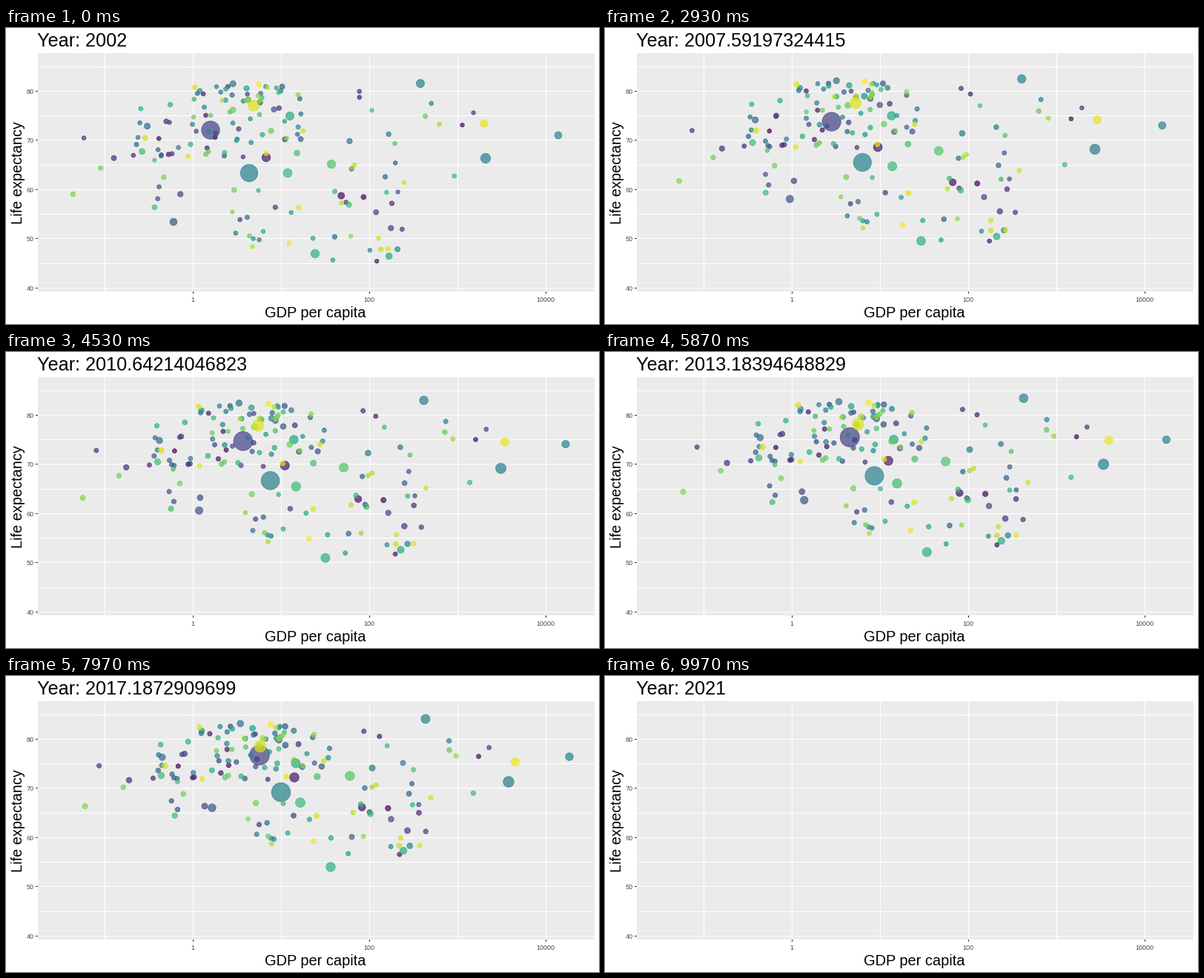
A matplotlib script that plays this animation: 800 px wide and 400 px high, repeating every 10 s.

```python
import numpy as np
import matplotlib
import matplotlib.pyplot as plt
from matplotlib.animation import FuncAnimation
from matplotlib.patches import Rectangle

W, H, DPI = 800, 400, 100
TICKS, LOOP, STEPS = 400, 10000, 300   # the picture steps 3 times in 4 ticks
START, SPAN, KNOWN_YEARS = 2002, 19, 18
TREND_YEARS = 15.2                     # time the key points below are apart
PX = 72 / DPI                          # points per pixel
LEFT, RIGHT, TOP, BOTTOM = 43, 794, 34, 356

plt.rcParams["font.family"] = "Liberation Sans"

# Main bubbles: start x, y, end x, y, radius, hue
BUBBLES = np.array([
    (276, 138, 342, 107, 12, .19),
    (328, 196, 371, 157, 11.5, .43),
    (334, 105, 343, 95, 7, .95),
    (417, 305, 438, 258, 5.5, .64),
    (647, 176, 678, 143, 6.4, .42),
    (645, 129, 687, 116, 5, .97),
    (559, 75, 566, 58, 5.3, .45),
    (383, 119, 391, 118, 5.3, .6),
    (439, 184, 464, 135, 5.5, .73),
    (380, 196, 397, 171, 5.7, .68),
    (351, 175, 389, 137, 5.5, .06),
    (226, 262, 278, 178, 4.6, .25),
    (745, 145, 760, 109, 4.6, .45),
])

# Groups of small dots: count, centre x, y, spread x, y
GROUPS = [
    (32, 325, 88, 45, 8),
    (54, 290, 138, 72, 24),
    (38, 425, 268, 78, 32),
    (18, 550, 150, 62, 48),
    (14, 165, 185, 50, 36),
]

rng = np.random.default_rng(7)


def scatter_group(count, cx, cy, sx, sy):
    # Even spread over 1.6 deviations keeps stray dots away
    offset = rng.uniform(-1.6, 1.6, (count, 2))
    return np.array([cx, cy]) + offset * [sx, sy]


def build_crowd():
    """Start and travel of the small dots; low ones climb the most."""
    begin = np.vstack([scatter_group(*g) for g in GROUPS])
    depth = np.clip(begin[:, 1] - 90, 0, None)
    drift = rng.normal(10, 6, len(begin)) + 17 * (depth > 0)
    return begin, np.column_stack([drift, -(11 + .28 * depth)])


CROWD, CROWD_TRAVEL = build_crowd()
N = len(CROWD)
HUE = np.concatenate([BUBBLES[:, 5], rng.random(N)])
RADIUS = np.concatenate([BUBBLES[:, 4],
                         np.clip(2.5 + rng.exponential(.4, N), 0, 4.2)]) + .2
ORDER = np.argsort(HUE)


def share(t, power):
    """Travelled part in x (easing out) and in y (steady)."""
    return np.array([1 - (1 - min(t, 1)) ** power, min(t, 1.1)])


def places(elapsed):
    t = elapsed / TREND_YEARS
    begin, end = BUBBLES[:, :2], BUBBLES[:, 2:4]
    main = begin + (end - begin) * share(t, 1.3)
    crowd = CROWD + CROWD_TRAVEL * share(t, 2)
    return np.vstack([main, crowd])[ORDER]


def areas(elapsed):
    r = RADIUS * (1 + .006 * elapsed)
    return ((2 * r * PX) ** 2)[ORDER]


fig = plt.figure(figsize=(W / DPI, H / DPI), dpi=DPI, facecolor="white")
ax = fig.add_axes([0, 0, 1, 1])
ax.set_xlim(0, W)
ax.set_ylim(H, 0)
ax.axis("off")


def box(x, y, w, h, color):
    ax.add_patch(Rectangle((x, y), w, h, fc=color, lw=0, antialiased=False))


def label(x, y, s, px, color="black", **kw):
    return ax.text(x, y, s, fontsize=px * PX, color=color, **kw)


def grid_x(k):
    return round(133 + 119.05 * k)


def grid_y(k):
    return round(51.6 + 33.27 * k)


box(LEFT, TOP, RIGHT - LEFT, BOTTOM - TOP, "#EBEBEB")
for k in range(10):
    box(LEFT, grid_y(k), RIGHT - LEFT, 1, "white")
for k in range(6):
    box(grid_x(k), TOP, 1, BOTTOM - TOP, "white")

# Every second grid line carries a tick and a label
for k in range(1, 10, 2):
    y = grid_y(k)
    box(LEFT - 3, y, 3, 1, "#333333")
    label(38, y + 4, str(85 - 5 * k), 9, "#4D4D4D", ha="right")
for k in range(1, 6, 2):
    x = grid_x(k)
    box(x, BOTTOM, 1, 3, "#333333")
    label(x, 370, str(10 ** (k - 1)), 9, "#4D4D4D", ha="center")

label(417.5, 391, "GDP per capita", 20, ha="center")
label(22, 195.5, "Life expectancy", 20, ha="center", va="baseline",
      rotation=90, rotation_mode="anchor")
title = label(42.5, 25, "", 25.3)

colors = matplotlib.colormaps["viridis"](HUE[ORDER])
colors[:, 3] = .7
dots = ax.scatter(*places(0).T, s=areas(0), facecolors=colors,
                  edgecolors=colors, linewidths=.9 * PX, zorder=3)


def draw(tick):
    step = int(tick * STEPS / TICKS + .5)
    elapsed = SPAN * step / (STEPS - 1)
    title.set_text(f"Year: {START + elapsed:.15g}")
    dots.set_visible(elapsed <= KNOWN_YEARS)
    dots.set_offsets(places(elapsed))
    dots.set_sizes(areas(elapsed))
    return title, dots


anim = FuncAnimation(fig, draw, frames=TICKS, interval=LOOP / TICKS,
                     repeat=True, repeat_delay=0)
plt.show()
```
